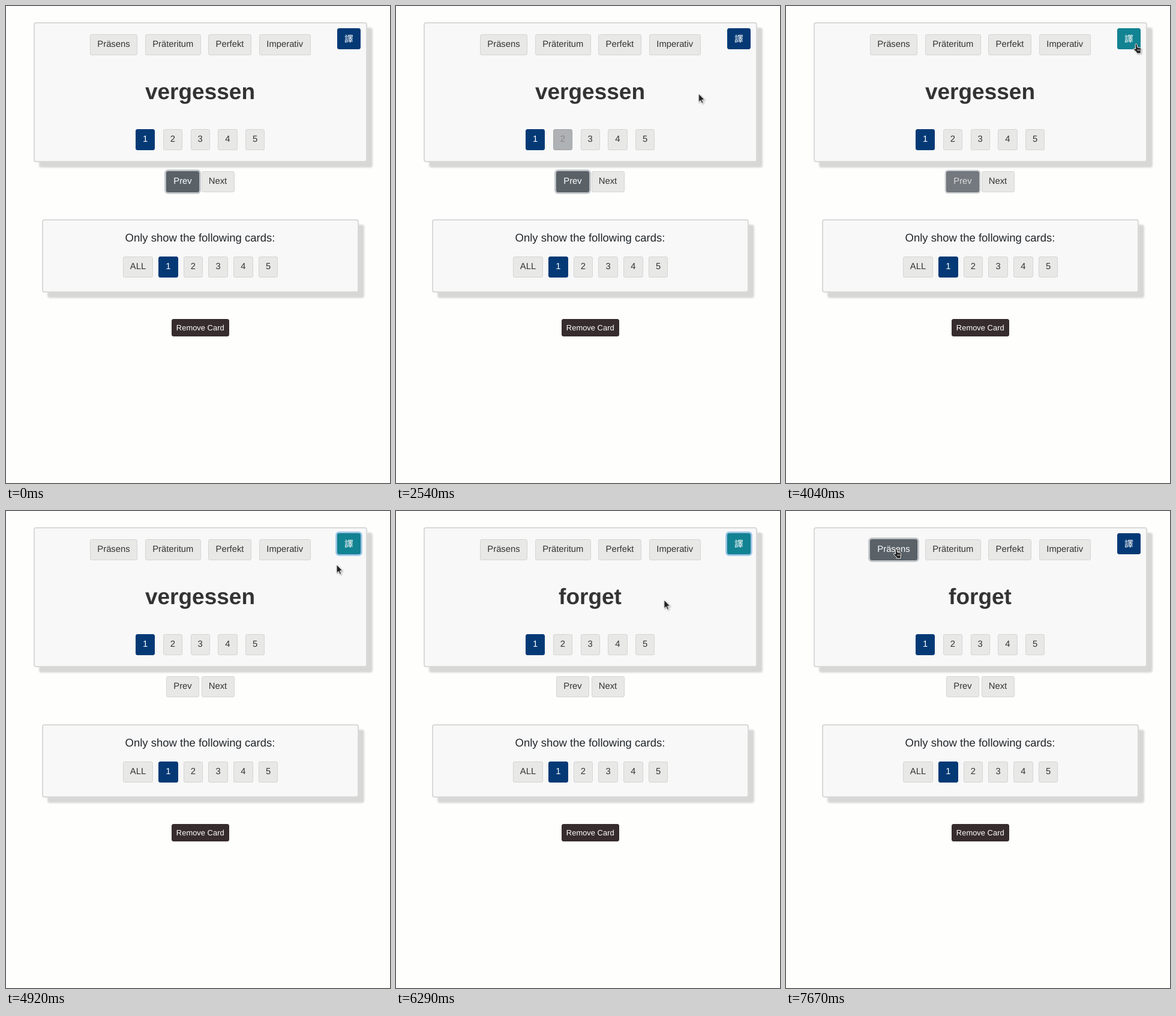
An HTML page for the animation above (8 s loop, 640 px wide and 794 px high).

```html
<!DOCTYPE html>
<html lang="en">
<head>
<meta charset="utf-8">
<title>Verb cards</title>
<style>
html, body { margin: 0; width: 100%; height: 100%; overflow: hidden; background: #fefefd; }
#stage {
  position: relative; width: 640px; height: 794px; overflow: hidden;
  font: 14.8px "Liberation Sans", Arial, sans-serif; color: #333;
  text-rendering: geometricPrecision;
}
#stage > * { position: absolute; box-sizing: border-box; }
.card { background: #f8f8f8; border: 2px solid #d8d9d8; border-radius: 4px; box-shadow: 9px 9px 3px #d7d7d6; }
.btn {
  height: 35px; line-height: 33px; text-align: center; white-space: nowrap;
  background: #e8e8e7; border: 1px solid #d5d5d4; border-radius: 3px;
}
.navy { background: #043975; border-color: #043975; color: #fff; }
.dark { background: #372c2d; border-color: #372c2d; color: #fff; font-size: 12.95px; }
.cjk { font-family: "Noto Sans CJK TC", "Noto Sans CJK JP", "Noto Sans CJK", sans-serif; }
.line { left: 0; width: 647px; text-align: center; white-space: nowrap; }
.title { top: 121px; height: 44px; line-height: 44px; font-size: 37px; font-weight: bold; }
.label { top: 374px; height: 24px; line-height: 24px; font-size: 18.5px; color: #212529; }
#cursor { left: 0; top: 0; width: 1px; height: 1px; overflow: visible; filter: drop-shadow(1px 1px 1px #0005); }
#cursor path { fill: #222; stroke: #fff; stroke-width: 1; stroke-linejoin: round; }
#cursor .fold { fill: none; stroke-width: .7; }
</style>
</head>
<body>
<div id="stage"></div>
<script>
const LOOP = 8000, TICK = 1000 / 24;
const stage = document.getElementById('stage');
const tracks = [];

function add(cls, text, box = {}) {
  const el = document.createElement('div');
  el.className = cls;
  el.textContent = text;
  for (const k in box) el.style[k] = box[k] + 'px';
  stage.append(el);
  return el;
}
const card = (left, top, width, height) => add('card', '', { left, top, width, height });
const button = (text, left, top, width, cls = '') => add('btn ' + cls, text, { left, top, width });

// Steps are [time, properties, easing towards the next step].
function track(el, steps) {
  const all = [[0, steps[0][1]], ...steps, [LOOP, steps[steps.length - 1][1]]];
  const frames = all.map(([time, props, easing = 'linear']) => ({ ...props, offset: time / LOOP, easing }));
  const anim = el.animate(frames, { duration: LOOP, fill: 'both' });
  anim.pause();
  tracks.push(anim);
}

// Visible state switches at each listed time.
function toggle(el, shown, times) {
  const steps = [[0, { opacity: +shown }]];
  for (const time of times) {
    steps.push([time, { opacity: +shown }]);
    shown = !shown;
    steps.push([time, { opacity: +shown }]);
  }
  track(el, steps);
}

card(46, 27, 556, 232.5);
card(60, 354.5, 528, 122);

const present = button('Präsens', 140, 46.5, 79);
button('Präteritum', 232, 46.5, 92.5);
button('Perfekt', 337, 46.5, 72);
button('Imperativ', 422, 46.5, 85.5);
const translate = button('譯', 552, 37, 39, 'navy cjk');

const german = add('line title', 'vergessen');
const english = add('line title', 'forget');

const levels = [1, 2, 3, 4, 5].map((n, i) =>
  button(n, 216 + 45.75 * i, 204.5, 32.4, i ? '' : 'navy'));
const prev = button('Prev', 267, 275, 55);
button('Next', 325.5, 275, 55);

add('line label', 'Only show the following cards:');
button('ALL', 195, 416.5, 50);
for (let i = 0; i < 5; i++) button(i + 1, 254 + 41.7 * i, 416.5, 32.5, i ? '' : 'navy');
const remove = button('Remove Card', 275.5, 521, 96.5, 'dark');
remove.style.height = '29px';
remove.style.lineHeight = '28px';

const look = (backgroundColor, borderColor, color, ring) =>
  ({ backgroundColor, borderColor, color, boxShadow: '0 0 0 ' + ring });
const plain = look('#e8e8e7', '#d5d5d4', '#333333', '0px #bfc3c700');
const hover = look('#5a6268', '#545b62', '#ffffff', '0px #bfc3c700');
const focus = look('#5a6268', '#545b62', '#ffffff', '2.8px #bfc3c7');
const navy = look('#043975', '#043975', '#ffffff', '0px #98c5e600');
const teal = look('#128392', '#117a8b', '#ffffff', '0px #98c5e600');
const tealFocus = look('#128392', '#117a8b', '#ffffff', '2.8px #98c5e6');

track(prev, [[4020, focus, 'ease'], [4170, plain]]);
track(levels[1], [[2390, plain, 'ease'], [2470, hover], [2490, hover, 'ease'], [2640, plain]]);
track(translate, [
  [2930, navy, 'ease'], [3080, teal], [4050, teal, 'ease'], [4200, tealFocus],
  [7480, tealFocus, 'ease'], [7630, navy]
]);
track(present, [[6710, plain, 'ease'], [6830, hover], [7480, hover, 'ease'], [7630, focus]]);
toggle(german, true, [5455]);
toggle(english, false, [5455]);

stage.insertAdjacentHTML('beforeend', `
  <svg id="cursor">
    <path id="arrow" d="M0 0V14.5L3.3 11.4 5.6 16.4 8 15.3 5.7 10.4H10.2Z"/>
    <g id="hand">
      <path d="M-2 1.4Q-1.8 0-.4 0 1 0 1.2 1.5L1.6 5.6 6.2 6.6Q8.3 7.2 8 9.4L7.2 13V16H.2V14L-4.4 9.4Q-4.8 7.4-2.6 7.8L-1.4 8.6Z"/>
      <path class="fold" d="M2 9V12M4 9V12M6 9.2V12"/>
    </g>
  </svg>`);

const path = [
  [1500, 53, 344], [1583, 72, 328], [1667, 103, 290], [1708, 119, 263], [1790, 131, 243],
  [2085, 131, 243], [2250, 150, 241], [2370, 225, 232], [2460, 300, 213], [2541, 504, 146],
  [2670, 553, 100], [2790, 574, 76], [2875, 581, 66], [2917, 581, 66], [2958, 583, 64], [3125, 584, 63],
  [4667, 584, 63], [4750, 580, 68], [4916, 551, 89], [5040, 533, 113], [5250, 515, 154],
  [6040, 515, 154], [6170, 492, 153], [6291, 447, 148], [6460, 370, 118], [6630, 275, 92],
  [6750, 225, 72], [6833, 210, 62], [6875, 210, 62], [6917, 180, 61], [7460, 180, 61], [7500, 184, 63]
];
track(document.getElementById('cursor'),
  path.map(([time, x, y]) => [time, { transform: `translate(${x}px, ${y}px)` }]));
toggle(document.getElementById('arrow'), false, [1495, 2950, 4785, 6745]);
toggle(document.getElementById('hand'), false, [2950, 4785, 6745]);

// The screen updates at 24 frames per second.
const start = performance.now();
function draw(now) {
  const time = Math.max(0, now - start) % LOOP;
  const held = Math.floor((time + 5) / TICK) * TICK % LOOP;
  for (const anim of tracks) anim.currentTime = held;
  requestAnimationFrame(draw);
}
draw(start);
</script>
</body>
</html>
```
